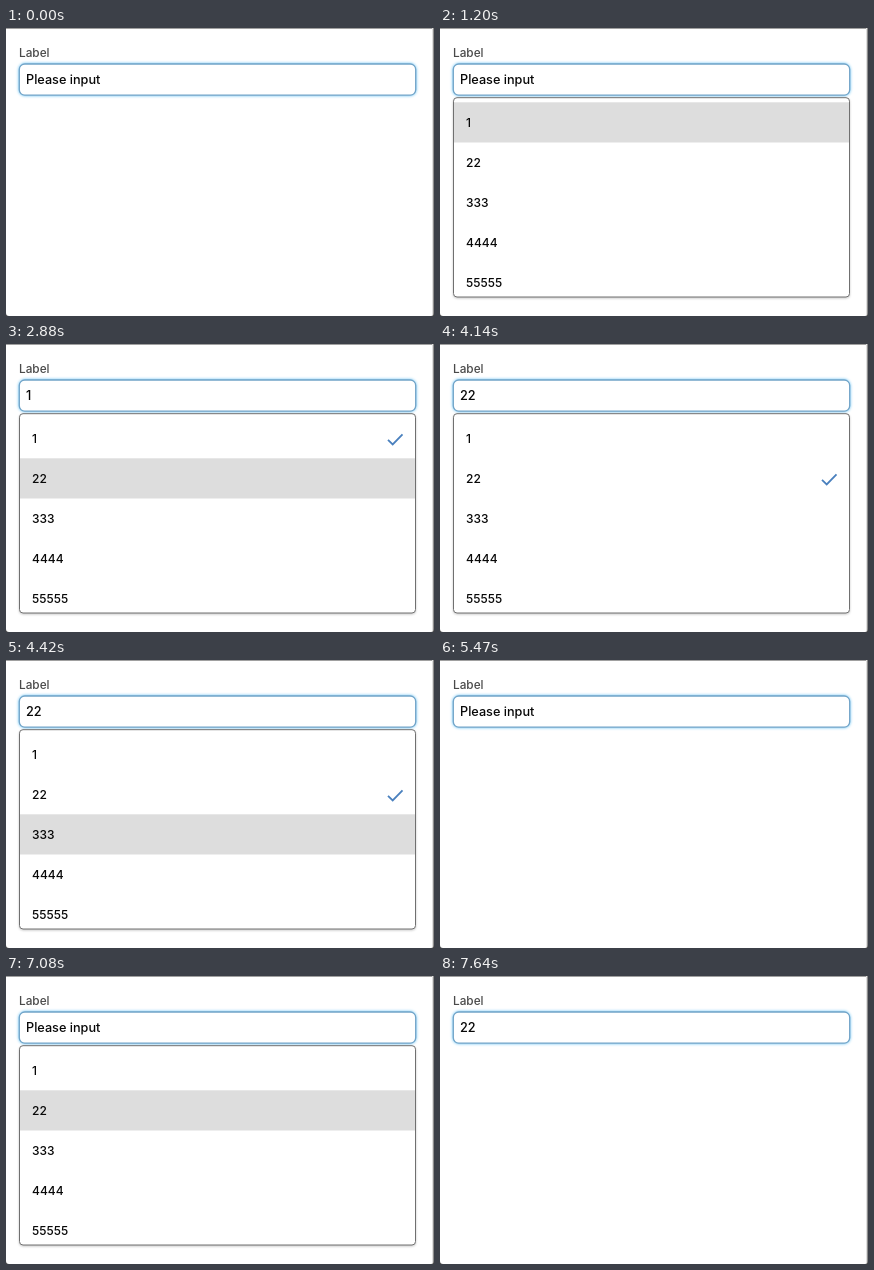
Animation, 428 px wide and 288 px high, one loop 8 s. Source, as an HTML page:

```html
<!DOCTYPE html>
<html lang="en">
<head>
<meta charset="utf-8">
<title>Combobox</title>
<style>
  html, body { margin: 0; width: 100%; height: 100%; overflow: hidden; background: #fff; }
  svg { display: block; width: 428px; height: 288px; font: 500 12px Inter, "Liberation Sans", sans-serif; }
  .input { fill: #fff; stroke: #72a4c8; stroke-width: 1.3; filter: drop-shadow(0 0 1.5px #62c0f4); }
  .list { fill: #fff; stroke: #707070; filter: drop-shadow(0 1.5px 1px rgba(0, 0, 0, .22)); }
  .check { fill: none; stroke: #4a80be; stroke-width: 1.8; }
</style>
</head>
<body>
<svg viewBox="0 0 428 288">
  <path d="M0 .5H428" stroke="#a0a0a0"/>
  <path d="M426.5 0V288" stroke="#dedede"/>
  <path d="M427.5 0V288" stroke="#8c8c8c"/>
  <path d="M0 285V288H3Q0 288 0 285M428 285V288H425Q428 288 428 285" fill="#444"/>
  <text x="13" y="29" font-size="11.8" fill="#4a4a4a">Label</text>
  <rect class="input" x="13.3" y="36" width="396.4" height="31.2" rx="5.5"/>
  <text id="value" x="20" y="56" font-size="12.7" fill="#080808"></text>
  <g id="popup">
    <rect class="list" x="13.5" y="69.7" width="396" height="199.3" rx="3.5"/>
    <rect id="hover" x="14" width="395" height="40.2" fill="#ddd"/>
    <path id="check" class="check" d="M382 21.5l4.7 4.6 9.8-10"/>
    <g id="options" fill="#080808"></g>
  </g>
</svg>
<script>
const $ = id => document.getElementById(id);
const names = ["1", "22", "333", "4444", "55555"];
const TOP = 74.3, ROW = 40, LOOP = 8000;

// [start ms, selected row, list open, hovered row]; -1 means none
const states = [
  [0, -1, false, -1],
  [500, -1, true, -1],
  [1200, -1, true, 0],
  [1760, 0, false, -1],
  [2390, 0, true, -1],
  [2740, 0, true, 0],
  [2880, 0, true, 1],
  [3300, 1, false, -1],
  [4140, 1, true, -1],
  [4350, 1, true, 1],
  [4420, 1, true, 2],
  [4840, 1, true, 1],
  [5470, -1, false, -1],
  [6730, -1, true, -1],
  [7010, -1, true, 0],
  [7080, -1, true, 1],
  [7640, 1, false, -1]
];

names.forEach((name, i) => {
  const text = document.createElementNS("http://www.w3.org/2000/svg", "text");
  text.setAttribute("x", 26);
  text.setAttribute("y", 99 + i * ROW);
  text.textContent = name;
  $("options").append(text);
});

const show = (el, on) => el.setAttribute("visibility", on ? "inherit" : "hidden");

function placeAtRow(el, row) {
  show(el, row >= 0);
  el.setAttribute("transform", `translate(0 ${TOP + row * ROW})`);
}

function draw(now) {
  const time = now % LOOP;
  const [, selected, open, hovered] = states.findLast(s => s[0] <= time);
  $("value").textContent = names[selected] ?? "Please input";
  show($("popup"), open);
  placeAtRow($("hover"), hovered);
  placeAtRow($("check"), selected);
}

const start = performance.now();
function frame() {
  draw(performance.now() - start);
  requestAnimationFrame(frame);
}
frame();
</script>
</body>
</html>
```
